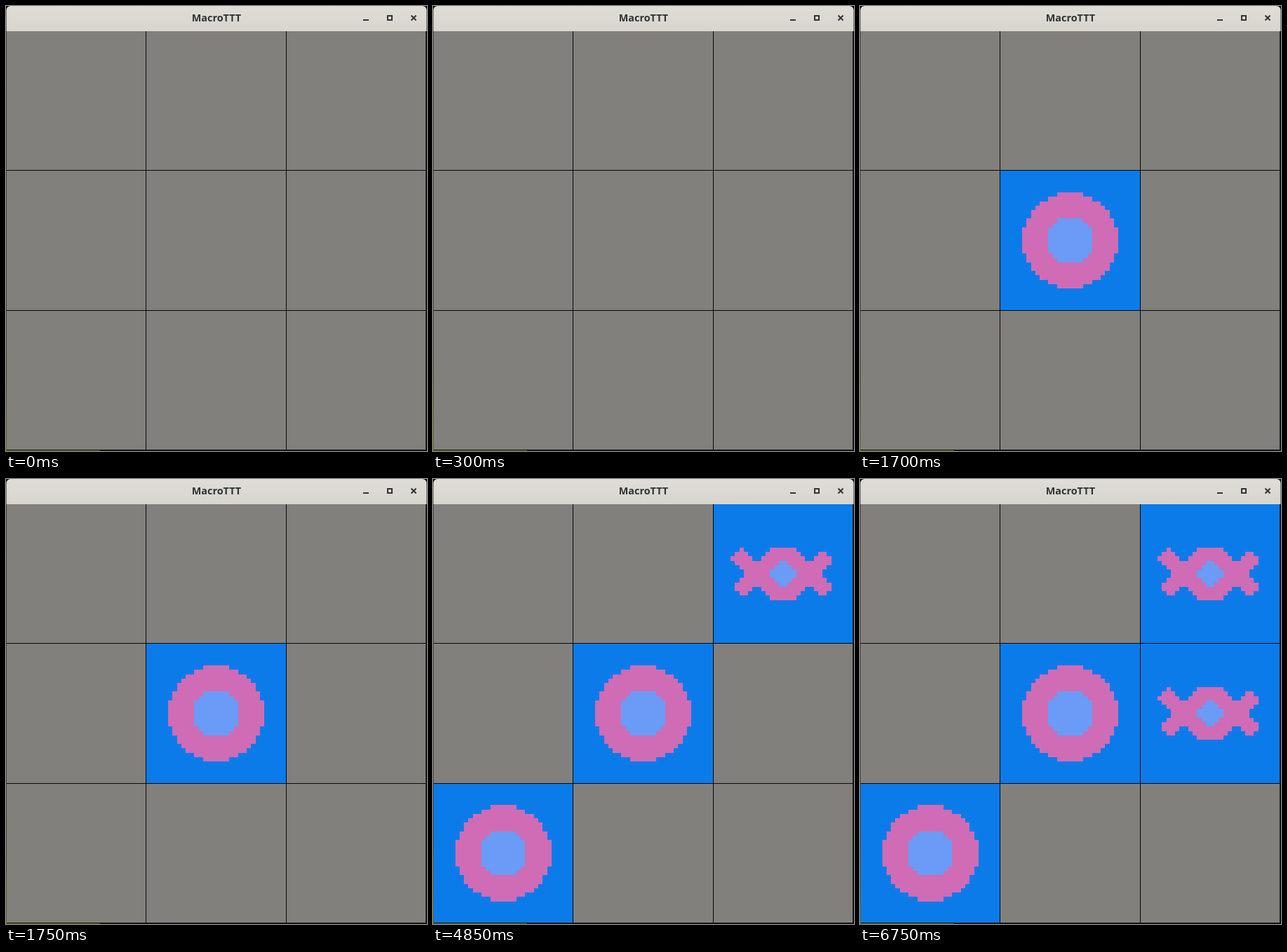
These frames come from a looping animation (600 px wide and 635 px high, 8 s). An HTML page with a canvas:

```html
<!DOCTYPE html>
<html lang="en">
<head>
<meta charset="utf-8">
<title>MacroTTT</title>
<style>
html, body { margin: 0; width: 100%; height: 100%; overflow: hidden; background: #111; }
canvas { display: block; }
</style>
</head>
<body>
<canvas id="stage" width="600" height="635"></canvas>
<script>
const ctx = document.getElementById('stage').getContext('2d');
const LOOP = 8000, CELL = 199.4, DOT = CELL / 32;
const GRAY = '#81807d', BLUE = '#0c7bea', PINK = '#cf6cb5', LIGHT = '#6a9bf6';

// Sprite rows on a 32 x 32 grid: [row, start, end, start, end, ...]
const mirror = (top, starts) => starts.concat([...starts].reverse())
  .map((s, i) => [top + i, s, 32 - s]);

const ring = {
  outer: mirror(5, [13, 11, 9, 8, 7, 7, 6, 6, 5, 5, 5]),
  inner: mirror(11, [13, 12, 11, 11, 11])
};
const candy = {
  outer: [
    [10, 6, 7, 13, 19],
    [11, 5, 8, 12, 20, 24, 26],
    [12, 4, 9, 11, 21, 23, 27],
    ...mirror(13, [5, 6, 7]),
    [19, 5, 9, 11, 21, 23, 27],
    [20, 6, 8, 12, 20, 24, 26],
    [21, 13, 19]
  ],
  inner: mirror(13, [15, 14, 13])
};

const moves = [
  { at: 1700, col: 1, row: 1, sprite: ring },
  { at: 3400, col: 2, row: 0, sprite: candy },
  { at: 4850, col: 0, row: 2, sprite: ring },
  { at: 6750, col: 2, row: 1, sprite: candy }
];

function rect(color, x, y, w, h) {
  ctx.fillStyle = color;
  ctx.fillRect(x, y, w, h);
}

function drawRows(rows, color, ox, oy) {
  for (const [r, ...spans] of rows) {
    const y = Math.round(oy + r * DOT);
    const h = Math.round(oy + (r + 1) * DOT) - y;
    for (let i = 0; i < spans.length; i += 2) {
      const x = Math.round(ox + spans[i] * DOT);
      rect(color, x, y, Math.round(ox + spans[i + 1] * DOT) - x, h);
    }
  }
}

function drawMove({ col, row, sprite }) {
  const ox = 0.5 + col * CELL, oy = 35.5 + row * CELL;
  const x = [1, 200, 400][col], y = [36, 235, 435][row];
  rect(BLUE, x, y, [199, 399, 598][col] - x, [234, 434, 633][row] - y);
  drawRows(sprite.outer, PINK, ox, oy);
  drawRows(sprite.inner, LIGHT, ox, oy);
}

function drawTitleBar() {
  const g = ctx.createLinearGradient(0, 0, 0, 36);
  g.addColorStop(0, '#e0ddd8');
  g.addColorStop(1, '#d8d5cf');
  ctx.fillStyle = g;
  ctx.beginPath();
  ctx.roundRect(0.5, 0, 599, 36, [6, 6, 0, 0]);
  ctx.fill();

  ctx.fillStyle = '#2f3436';
  ctx.font = '700 14.4px "Open Sans", "Noto Sans", sans-serif';
  ctx.textAlign = 'center';
  ctx.fillText('MacroTTT', 300, 22);

  rect('#2f3436', 509, 19, 8, 2);
  ctx.strokeStyle = '#2f3436';
  ctx.lineWidth = 2;
  ctx.strokeRect(544, 14, 6, 6);
  ctx.beginPath();
  ctx.moveTo(577.5, 13.5);
  ctx.lineTo(584.5, 20.5);
  ctx.moveTo(584.5, 13.5);
  ctx.lineTo(577.5, 20.5);
  ctx.stroke();
}

function drawBoard() {
  rect(GRAY, 1, 36, 597, 597);
  for (const x of [199, 399]) rect('#080808', x, 36, 1, 597);
  for (const y of [234, 434]) rect('#080808', 1, y, 597, 1);
}

function drawBackdrop() {
  rect('#151412', 0, 0, 600, 635);
  const g = ctx.createLinearGradient(0, 36, 0, 635);
  g.addColorStop(0, '#45423e');
  g.addColorStop(0.7, '#4a443a');
  g.addColorStop(0.8, '#4c4720');
  g.addColorStop(1, '#6b6d08');
  ctx.fillStyle = g;
  ctx.fillRect(0, 36, 1, 599);
  rect('#70700c', 0, 634, 134, 1);
}

function draw(t) {
  drawBackdrop();
  drawTitleBar();
  drawBoard();
  moves.filter(m => t >= m.at).forEach(drawMove);
}

const start = performance.now();
function tick() {
  draw((performance.now() - start) % LOOP);
  requestAnimationFrame(tick);
}
tick();
</script>
</body>
</html>
```
